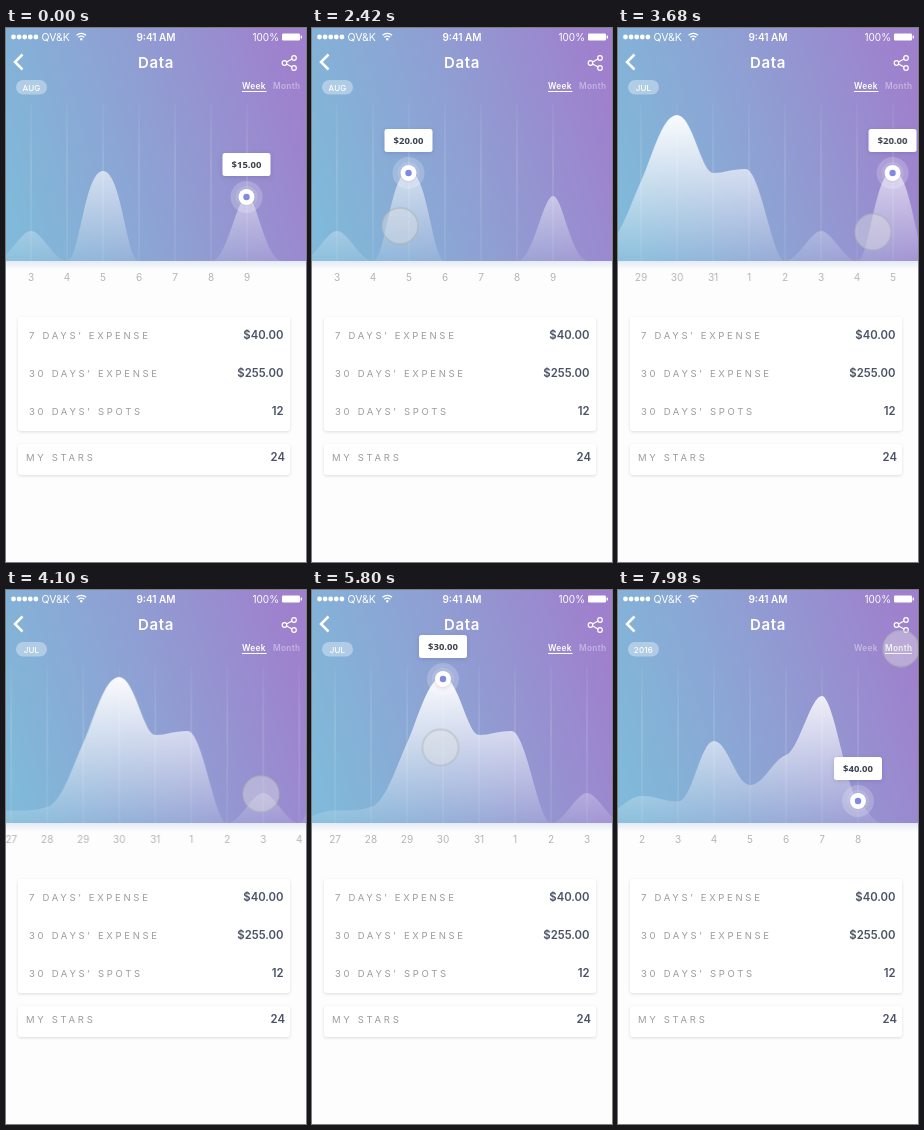
Write an HTML page that moves like this. It is 300 px wide and 534 px high and loops after 8 s.

```html
<!DOCTYPE html>
<html lang="en">
<head>
<meta charset="utf-8">
<title>Data</title>
<style>
  html, body { margin: 0; width: 100%; height: 100%; overflow: hidden; background: #fdfdfd; }
  svg { display: block; width: 100vw; height: 100vh; }
  text { font-family: Inter, Roboto, sans-serif; fill: #fff; }
  .mid { text-anchor: middle; }
  .end { text-anchor: end; }
  .status { font-size: 10.5px; }
  .title { font-size: 15px; font-weight: 600; letter-spacing: .7px; }
  .pill { font-size: 8px; font-weight: 500; letter-spacing: .2px; }
  .tab { font-size: 8.3px; font-weight: 600; letter-spacing: .3px; }
  .tick { font-size: 10px; fill: #b3b4ba; }
  .name { font-size: 9.5px; letter-spacing: 2.7px; fill: #9c9ca1; }
  .value { font-size: 11.3px; font-weight: 600; fill: #4a5266; }
  .price { font: 700 9.5px "Open Sans", "Noto Sans", sans-serif; fill: #3c404c; }
  .card { fill: #fff; filter: drop-shadow(0 1.5px 1.5px rgba(0,0,0,.13)); }
  .bubble { fill: #fff; filter: drop-shadow(0 1px 2px rgba(60,50,120,.2)); }
  .line { fill: none; stroke: #fff; }
</style>
</head>
<body>
<svg viewBox="0 0 300 534">
  <defs>
    <linearGradient id="sky" gradientUnits="userSpaceOnUse" x1="0" y1="165" x2="300" y2="75">
      <stop offset="0" stop-color="#80b9d9"/>
      <stop offset=".5" stop-color="#8f9fd3"/>
      <stop offset="1" stop-color="#9f80cd"/>
    </linearGradient>
    <linearGradient id="hill" gradientUnits="userSpaceOnUse" x1="0" y1="85" x2="0" y2="233">
      <stop offset="0" stop-color="#fff" stop-opacity=".97"/>
      <stop offset="1" stop-color="#fff" stop-opacity=".1"/>
    </linearGradient>
    <linearGradient id="grid" gradientUnits="userSpaceOnUse" x1="0" y1="76" x2="0" y2="233">
      <stop offset="0" stop-color="#fff" stop-opacity=".08"/>
      <stop offset=".4" stop-color="#fff" stop-opacity=".24"/>
      <stop offset="1" stop-color="#fff" stop-opacity=".12"/>
    </linearGradient>
    <linearGradient id="shade" x1="0" y1="0" x2="0" y2="1">
      <stop offset="0" stop-color="#a9bfe0" stop-opacity=".3"/>
      <stop offset="1" stop-color="#a9bfe0" stop-opacity="0"/>
    </linearGradient>
  </defs>

  <rect width="300" height="534" fill="#fdfdfd"/>
  <rect y="233" width="300" height="9" fill="url(#shade)"/>
  <rect width="300" height="233" fill="url(#sky)"/>

  <g id="week"><g id="days"></g></g>
  <g id="month"></g>

  <g id="dots" fill="#fff"></g>
  <text class="status" x="35.5" y="13">QV&amp;K</text>
  <g class="line" stroke-width="1.3">
    <path d="M70.5 7.3q4.8-4 9.600 0M72.300 9.300q3-2.300 6 0"/>
    <circle cx="75.300" cy="11.300" r=".6"/>
  </g>
  <text class="status mid" x="150" y="13" font-weight="600" style="font-size:10px">9:41 AM</text>
  <text class="status end" x="273" y="13" style="font-size:10px">100%</text>
  <rect x="276" y="5.500" width="18" height="7" rx="1.200" fill="#fff"/>
  <rect x="294.600" y="7.500" width="1.400" height="3" rx=".6" fill="#fff"/>

  <path class="line" stroke-width="2.500" d="M16.500 26.500L9 34l7.500 7.500"/>
  <text class="title mid" x="150" y="39.500">Data</text>
  <g class="line" stroke-width="1.200">
    <path d="M280.500 34l6-3.300M280.500 36l6 3.300"/>
    <circle cx="278.500" cy="35" r="2.300"/>
    <circle cx="288" cy="30" r="2.300"/>
    <circle cx="288" cy="40" r="2.300"/>
  </g>

  <rect x="10" y="52" width="31" height="14.500" rx="7.200" fill="#fff" opacity=".36"/>
  <text class="pill mid" id="aug" x="25.500" y="62.500">AUG</text>
  <text class="pill mid" id="jul" x="25.500" y="62.500">JUL</text>
  <text class="pill mid" id="year" x="25.500" y="62.500">2016</text>

  <text class="tab" id="weekTab" x="236" y="60.500">Week</text>
  <path class="line" id="weekBar" d="M236 63.500h24.500"/>
  <text class="tab" id="monthTab" x="267" y="60.500">Month</text>
  <path class="line" id="monthBar" d="M267 63.500h27"/>

  <rect class="card" x="12" y="289" width="272" height="114" rx="3"/>
  <rect class="card" x="12" y="416" width="272" height="31" rx="3"/>
  <g id="rows"></g>

  <g id="touch">
    <circle r="18" fill="#e2e2e4" fill-opacity=".42" stroke="#a9b2b4" stroke-opacity=".6" stroke-width="1.400"/>
  </g>
</svg>
<script>
const LOOP = 8000, STEP = 36, BASE = 233;
const byId = id => document.getElementById(id);

function add(parent, tag, attrs, text) {
  const el = document.createElementNS('http://www.w3.org/2000/svg', tag);
  for (const key in attrs) el.setAttribute(key, attrs[key]);
  if (text !== undefined) el.textContent = text;
  return parent.appendChild(el);
}

// Each point: position in steps, height, handle length in steps, slope per step.
function hill(parent, x0, points) {
  const at = (p, dir) => {
    const [pos, y, handle = .4, slope = 0] = p;
    return `${x0 + STEP * (pos + dir * handle)} ${y + dir * handle * slope}`;
  };
  let d = `M${at(points[0], 0)}`;
  for (let i = 1; i < points.length; i++)
    d += `C${at(points[i - 1], 1)} ${at(points[i], -1)} ${at(points[i], 0)}`;
  add(parent, 'path', { d: d + `V${BASE}H${x0 + STEP * points[0][0]}Z`, fill: 'url(#hill)' });
}

function ticks(parent, x0, first, labels) {
  labels.forEach((label, i) => {
    const x = x0 + STEP * (first + i);
    add(parent, 'rect', { x: x - .5, y: 76, width: 1, height: BASE - 76, fill: 'url(#grid)' });
    add(parent, 'text', { class: 'tick mid', x, y: 252.5 }, label);
  });
}

function marker(parent, x, y, price) {
  const g = add(parent, 'g', { transform: `translate(${x} ${y})` });
  add(g, 'circle', { r: 16, fill: '#fff', 'fill-opacity': .2 });
  add(g, 'circle', { r: 11, fill: '#fff', 'fill-opacity': .16 });
  add(g, 'circle', { r: 8, class: 'bubble' });
  add(g, 'circle', { r: 3.2, fill: '#7f8ae0' });
  add(g, 'rect', { class: 'bubble', x: -24, y: -44, width: 48, height: 23, rx: 2.5 });
  add(g, 'text', { class: 'price mid', x: 0, y: -29 }, price);
  return g;
}

const days = byId('days'), month = byId('month');
hill(days, 25, [
  [-9, 232], [-8, 228], [-7, 220.5], [-6, 217, .4, -10], [-5, 153, .3, -78], [-4, 87, .42],
  [-3, 145, .32], [-2.1, 141, .42], [-1, BASE, .35], [0, 203, .3], [1, BASE, .35],
  [2, 143, .52], [3, BASE, .35], [5, BASE, .45], [6, 168, .28], [7, BASE, .5]
]);
ticks(days, 25, -8, [26, 27, 28, 29, 30, 31, 1, 2, 3, 4, 5, 6, 7, 8, 9]);
const day9 = marker(days, 240.5, 169, '$15.00');
const day5 = marker(days, 96.5, 145, '$20.00');
const day30 = marker(days, -119, 89, '$30.00');

hill(month, 24, [
  [-1, 222], [0, 206], [1, 211.5], [2, 151, .38], [3, 195, .38],
  [4, 165, .35, -12], [5, 106, .32], [6, 211, .3, 30], [6.7, BASE, .3]
]);
ticks(month, 24, 0, [2, 3, 4, 5, 6, 7, 8]);
marker(month, 240, 211, '$40.00');

for (let i = 0; i < 5; i++) add(byId('dots'), 'circle', { cx: 7.5 + 5.6 * i, cy: 9, r: 2.4 });

[
  ['7 DAYS’ EXPENSE', 23, '$40.00', 277.5, 311],
  ['30 DAYS’ EXPENSE', 23, '$255.00', 277.5, 348.7],
  ['30 DAYS’ SPOTS', 23, '12', 277.5, 387],
  ['MY STARS', 20, '24', 279, 433.3]
].forEach(([name, x, value, right, y]) => {
  add(byId('rows'), 'text', { class: 'name', x, y }, name);
  add(byId('rows'), 'text', { class: 'value end', x: right, y }, value);
});

// Steps: [time, value, easing towards the next step].
const clock = document.timeline.currentTime || 0;
function play(el, prop, steps, show = v => v) {
  const frames = steps.map(([t, v, easing = 'linear']) =>
    ({ offset: t / LOOP, [prop]: show(v), easing }));
  frames.unshift({ ...frames[0], offset: 0, easing: 'linear' });
  frames.push({ ...frames[frames.length - 1], offset: 1 });
  el.animate(frames, { duration: LOOP, iterations: Infinity }).startTime = clock;
}
const fade = (el, ...steps) => play(el, 'opacity', steps);
const move = (el, steps) => play(el, 'transform', steps, ([x, y]) => `translate(${x}px, ${y}px)`);

const GLIDE = 'cubic-bezier(.4, 0, .6, 1)';
const FLING = 'cubic-bezier(.333, 1, .667, 1)';

move(byId('touch'), [
  [400, [322, 238], GLIDE], [1960, [88, 197]],
  [2480, [88, 198]], [3240, [191, 202.5]], [3650, [255, 204]],
  [4150, [255, 204], GLIDE], [4780, [128.5, 157.5]],
  [5880, [128.5, 157.5], GLIDE], [6420, [281, 63]],
  [7400, [281, 63], GLIDE], [7940, [283, 58.5]]
]);
move(days, [[2480, [0, 0]], [3240, [108, 0]], [3650, [172, 0], FLING], [4810, [250, 0]]]);

fade(day9, [2000, 1], [2250, 0]);
fade(day5, [2050, 0], [2350, 1]);
fade(day30, [5300, 0], [5700, 1]);

const SWAP = [6720, 7250];
const leave = (el, low = 0) => fade(el, [SWAP[0], 1], [SWAP[1], low]);
const enter = (el, low = 0) => fade(el, [SWAP[0], low], [SWAP[1], 1]);
leave(byId('week'));
enter(month);
leave(byId('weekTab'), .4);
enter(byId('monthTab'), .4);
leave(byId('weekBar'));
enter(byId('monthBar'));
enter(byId('year'));
fade(byId('aug'), [3560, 1], [3561, 0]);
fade(byId('jul'), [3560, 0], [3561, 1], [SWAP[0], 1], [SWAP[1], 0]);
</script>
</body>
</html>
```
